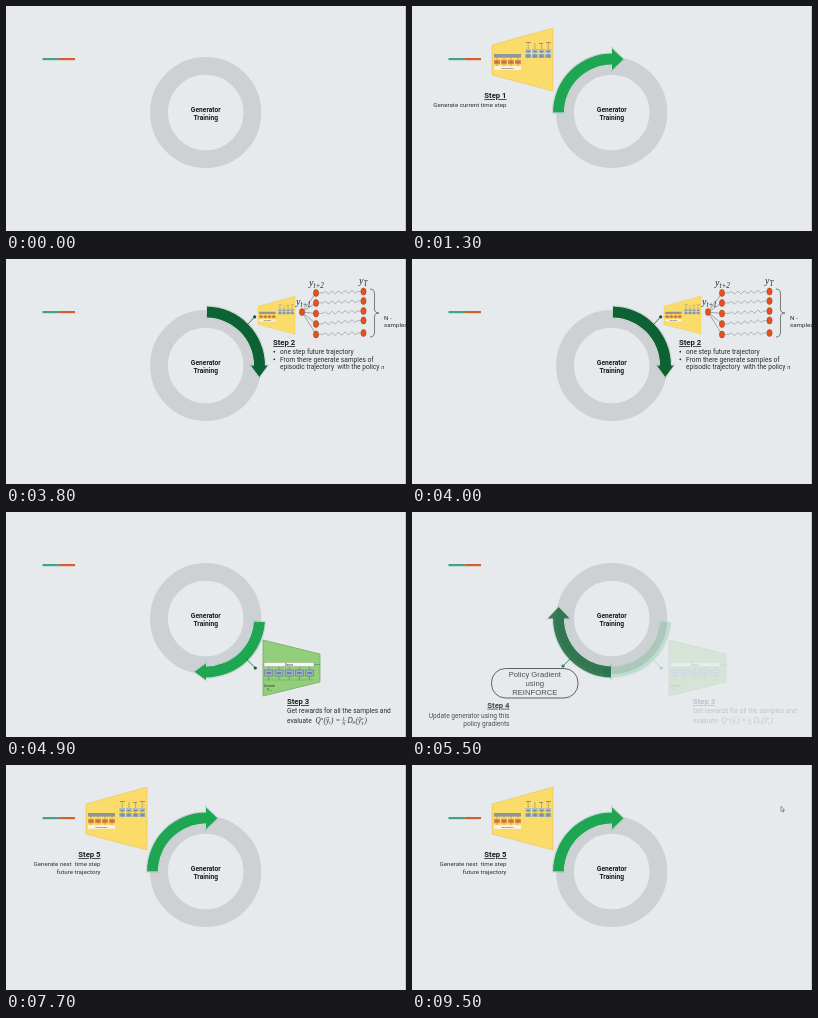
Write an HTML page that moves like this. It is 400x225 px and loops after 9600 ms.

```html
<!DOCTYPE html>
<html lang="en">
<head>
<meta charset="utf-8">
<title>Generator Training</title>
<style>
html, body { margin: 0; width: 100%; height: 100%; overflow: hidden; background: #e6eaed; }
svg { display: block; width: 400px; height: 225px; }
text { font-family: Roboto, "Open Sans", sans-serif; font-size: 6.6px; fill: #2b2c2e; white-space: pre; }
.title { font-weight: 700; font-size: 7.7px; text-decoration: underline; fill: #1c1d1f; }
.hub { font-weight: 700; font-size: 6.7px; text-anchor: middle; fill: #1c1d1f; }
.end { text-anchor: end; }
.small { font-size: 6.2px; }
.box { font-family: "Liberation Sans", Arial, sans-serif; font-size: 7.7px; text-anchor: middle; }
.math { font-family: "Liberation Serif", "Noto Serif", serif; font-style: italic; }
.tiny { font-size: 2.4px; text-anchor: middle; }
.step { opacity: 0; }
</style>
</head>
<body>
<svg id="stage" viewBox="0 0 400 225"></svg>
<script>
const LOOP = 9600, FADE = 250;
const DARK = '#0d6233', BRIGHT = '#1fa653';

const text = (x, y, s, cls = '', extra = '') =>
  `<text x="${x}" y="${y}" class="${cls}" ${extra}>${s}</text>`;
const rect = (x, y, w, h, fill, extra = '') =>
  `<rect x="${x}" y="${y}" width="${w}" height="${h}" fill="${fill}" ${extra}/>`;
const path = (d, color, width = 0.6) =>
  `<path d="${d}" fill="none" stroke="${color}" stroke-width="${width}"/>`;
const poly = (points, fill, extra = '') => `<polygon points="${points}" fill="${fill}" ${extra}/>`;
const row = (n, draw) => Array.from({ length: n }, (_, i) => draw(i)).join('');
const sub = (base, low, size) =>
  `${base}<tspan font-size="${size * 0.72}" dy="${size * 0.2}">${low}</tspan>`;

// Quarter-turn arrow around the ring, clockwise from the top
function arrow(turn, color, head, skip = 0) {
  const a = skip * Math.PI / 180, s = Math.sin(a), c = -Math.cos(a);
  const d = `M${59 * s} ${59 * c}A59 59 0 0 1 59 0L${53.3 + head} 0L53.3 11.5L${53.3 - head} 0` +
    `L48 0A48 48 0 0 0 ${48 * s} ${48 * c}Z`;
  return `<g transform="translate(200 106.5) rotate(${turn})">
    <path d="${d}" fill="#777" opacity=".25" stroke="#777" stroke-width="1.8"/>
    <path d="${d}" fill="${color}" stroke="#e4efe8" stroke-width="1" paint-order="stroke"/></g>`;
}

const link = (x1, y1, x2, y2) =>
  path(`M${x1} ${y1}L${x2} ${y2}`, '#0b5a2e', 0.8) + `<circle cx="${x2}" cy="${y2}" r="1.6" fill="#0b5a2e"/>`;

// Yellow encoder/decoder block
function network(place = '') {
  const labels = row(4, i => {
    const x = 116.2 + i * 6.7;
    return path(`M${x} 52V37`, '#7d7a55', 0.5) +
      rect(x - 2.8, 43, 5.6, 4, '#a9bcc4') + rect(x - 2.8, 48, 5.6, 4, '#8fa9b8') +
      rect(x - 1.6, 45, 3.2, 0.7, '#53636b') + rect(x - 1.6, 49.7, 3.2, 0.7, '#53636b');
  });
  const cells = row(4, i => {
    const x = 82 + i * 7;
    return path(`M${x + 3} 60V51`, '#7d7a55', 0.5) + rect(x, 54, 6, 4.2, '#e08a4c') +
      rect(x + 1.4, 55.7, 3.2, 0.8, '#8a4a24');
  });
  return `<g ${place}>` +
    poly('80,39 141,22 141,85 80,69', '#fbdb69', 'stroke="#e6c45a" stroke-width=".6"') +
    labels + path('M114 36.5H119M127 37.5H131M134 36.5H139', '#8b8360', 0.8) +
    cells + rect(82, 48, 27, 3.6, '#8f9697') + rect(82, 60.2, 27, 3.6, '#f7f4e6') +
    text(95.5, 63, 'Embedding', 'tiny') + '</g>';
}

function wave(x1, y1, x2, y2) {
  const n = 48;
  return path('M' + row(n + 1, i => {
    const u = i / n, lift = u > 0.12 && u < 0.9 ? Math.sin((u - 0.12) / 0.78 * Math.PI * 10) * 1.3 : 0;
    return `${(x1 + (x2 - x1) * u).toFixed(2)} ${(y1 + (y2 - y1) * u - lift).toFixed(2)} `;
  }), '#777b7e', 0.5);
}

function rollout() {
  const left = [34, 44, 54.5, 65, 75.5], right = [32.5, 42, 52, 61.5, 74];
  const node = (x, y) =>
    `<ellipse cx="${x}" cy="${y}" rx="2.6" ry="3.5" fill="#e8511b" stroke="#8f3a1c" stroke-width=".5"/>`;
  return left.map((y, i) => path(`M296 53L310 ${y}`, '#5c5f62', 0.5) + wave(312.5, y, 355, right[i])).join('') +
    node(296, 53) + left.map(y => node(310, y)).join('') + right.map(y => node(357.5, y)).join('') +
    path('M364 30Q368.500 30 368.500 35V50Q368.500 54 373 54Q368.500 54 368.500 58V73Q368.500 78 364 78', '#4a4c4e', 0.7) +
    text(303, 27, sub('y', 't+2', 10), 'math', 'style="font-size:10px"') +
    text(353, 25, sub('y', 'T', 10), 'math', 'style="font-size:10px"') +
    text(290, 45.5, sub('y', 't+1', 10), 'math', 'style="font-size:10px"') +
    text(378, 61, 'N -', 'small') + text(378, 68.3, 'samples', 'small');
}

function scorer() {
  return poly('257,128 314,142 314,170 257,184', '#93cf7b', 'stroke="#67a653" stroke-width=".7"') +
    rect(258, 150.3, 50, 4.4, '#f4f8f1', 'stroke="#6d8f60" stroke-width=".4"') +
    text(283, 153.6, 'Dense', 'tiny', 'style="font-size:3px"') +
    path('M308 152.500H314', '#557a48', 0.5) +
    row(5, i => {
      const x = 258.8 + i * 10.2;
      return path(`M${x + 4} 168V154.700`, '#557a48', 0.5) +
        rect(x, 158, 8, 6, '#9fb0cf', 'stroke="#53648c" stroke-width=".5"') +
        rect(x + 1.6, 160.4, 4.8, 1.2, '#53648c');
    }) + path('M258.500 168H308', '#6d9a5c', 0.5) +
    text(263.5, 174.5, 'Generator', 'tiny', 'style="font-size:2.6px"') +
    text(263.5, 179, 'Y<tspan font-size="2">1:T</tspan>', 'tiny', 'style="font-size:3.4px"');
}

function formula() {
  const m = (x, y, s, size = 7.2) => text(x, y, s, 'math', `style="font-size:${size}px"`);
  return m(309.5, 210.5, 'Q') + m(314.7, 207.6, 'π', 4.8) + m(317.5, 210.5, '(ŷ') + m(323.2, 212, 't', 4.8) +
    m(325, 210.5, ')') + m(329.5, 210.5, '=') + m(336.6, 207.6, '1', 4.6) +
    path('M336 208.800H339.800', '#2b2c2e', 0.4) + m(336.2, 213, 'N', 4.6) +
    m(341.5, 210.5, 'D') + m(346.6, 212, 'θ', 4.8) + m(349.5, 210.5, '(ŷ') +
    m(355.3, 207.8, 'n', 4.4) + m(355.3, 212.6, 'T', 4.4) + m(358.6, 210.5, ')');
}

const bullet = (y, s) =>
  `<circle cx="268.300" cy="${y - 2.3}" r="0.900" fill="#2b2c2e"/>` + text(274, y, s);

const steps = [
  { from: 900, to: 1900, art: arrow(270, BRIGHT, 11) + network() +
    text(94.5, 92, 'Step 1', 'title end') + text(94.5, 101, 'Generate current time step', 'end small') },
  { from: 1900, to: 4200, art: arrow(0, DARK, 8.5, 1) + link(240, 67, 248.7, 57.8) +
    network('transform="translate(252 37) scale(.607) translate(-80 -22)"') + rollout() +
    text(267, 86, 'Step 2', 'title') + bullet(95, 'one step future trajectory') +
    bullet(102.6, 'From there generate samples of') +
    text(274, 110.2, 'episodic trajectory  with the policy <tspan class="math">π</tspan>') },
  { from: 4200, to: 5300, art: arrow(90, BRIGHT, 8.5, 3.5) + link(240, 146.5, 249.3, 156) + scorer() +
    text(281, 192, 'Step 3', 'title') + text(281, 201, 'Get rewards for all the samples and') +
    text(281, 210.5, 'evaluate') + formula() },
  { from: 5300, to: 7000, art: arrow(180, DARK, 11, 1) + link(165, 140, 151, 154) +
    rect(79.5, 156.5, 86.5, 29.5, '#e6eaed', 'rx="14" stroke="#3e4042" stroke-width="1"') +
    text(122.8, 165.3, 'Policy Gradient', 'box') + text(122.8, 174.3, 'using', 'box') +
    text(122.8, 183.3, 'REINFORCE', 'box') + text(97.5, 195.7, 'Step 4', 'title end') +
    text(97.5, 205.5, 'Update generator using this', 'end') + text(97.5, 214.3, 'policy gradients', 'end') },
  { from: 7000, to: LOOP, art: arrow(270, BRIGHT, 11) + network() +
    text(94.5, 92, 'Step 5', 'title end') + text(94.5, 101, 'Generate next  time step', 'end small') +
    text(94.5, 109.3, 'future trajectory', 'end small') }
];

const stage = document.getElementById('stage');
stage.innerHTML = rect(0, 0, 400, 225, '#e6eaed') + rect(399, 0, 1, 225, '#c6cacd') +
  rect(36.5, 52, 16.3, 2.2, '#43a08a') + rect(52.8, 52, 16.2, 2.2, '#d2602f') +
  '<circle cx="199.700" cy="106.500" r="46.700" fill="none" stroke="#cdd1d4" stroke-width="17.800"/>' +
  text(199.8, 105.6, 'Generator', 'hub') + text(199.8, 114.4, 'Training', 'hub') +
  steps.map(s => `<g class="step">${s.art}</g>`).join('') +
  '<path id="cursor" d="M0 0V5L1.200 4L2 5.800L2.900 5.400L2.100 3.700H3.700Z" fill="#f4f5f6" stroke="#55595d" stroke-width=".6" opacity="0"/>';

const timing = { duration: LOOP, iterations: Infinity };
const at = (ms, props) => ({ offset: Math.min(ms, LOOP) / LOOP, ...props });

stage.querySelectorAll('.step').forEach((g, i) => {
  const { from, to } = steps[i];
  const frames = [at(0, { opacity: 0 }), at(from, { opacity: 0 }), at(from + FADE, { opacity: 1 }), at(to, { opacity: 1 })];
  if (to < LOOP) frames.push(at(to + FADE, { opacity: 0 }), at(LOOP, { opacity: 0 }));
  g.animate(frames, timing);
});

const pos = (ms, x, y, opacity) => at(ms, { transform: `translate(${x}px, ${y}px)`, opacity });
document.getElementById('cursor').animate([
  pos(0, 398, 4, 0), pos(8300, 398, 4, 0), pos(8300, 398, 4, 1),
  pos(8800, 369, 41.3, 1), pos(LOOP, 369, 41.3, 1)
], timing);
</script>
</body>
</html>
```
